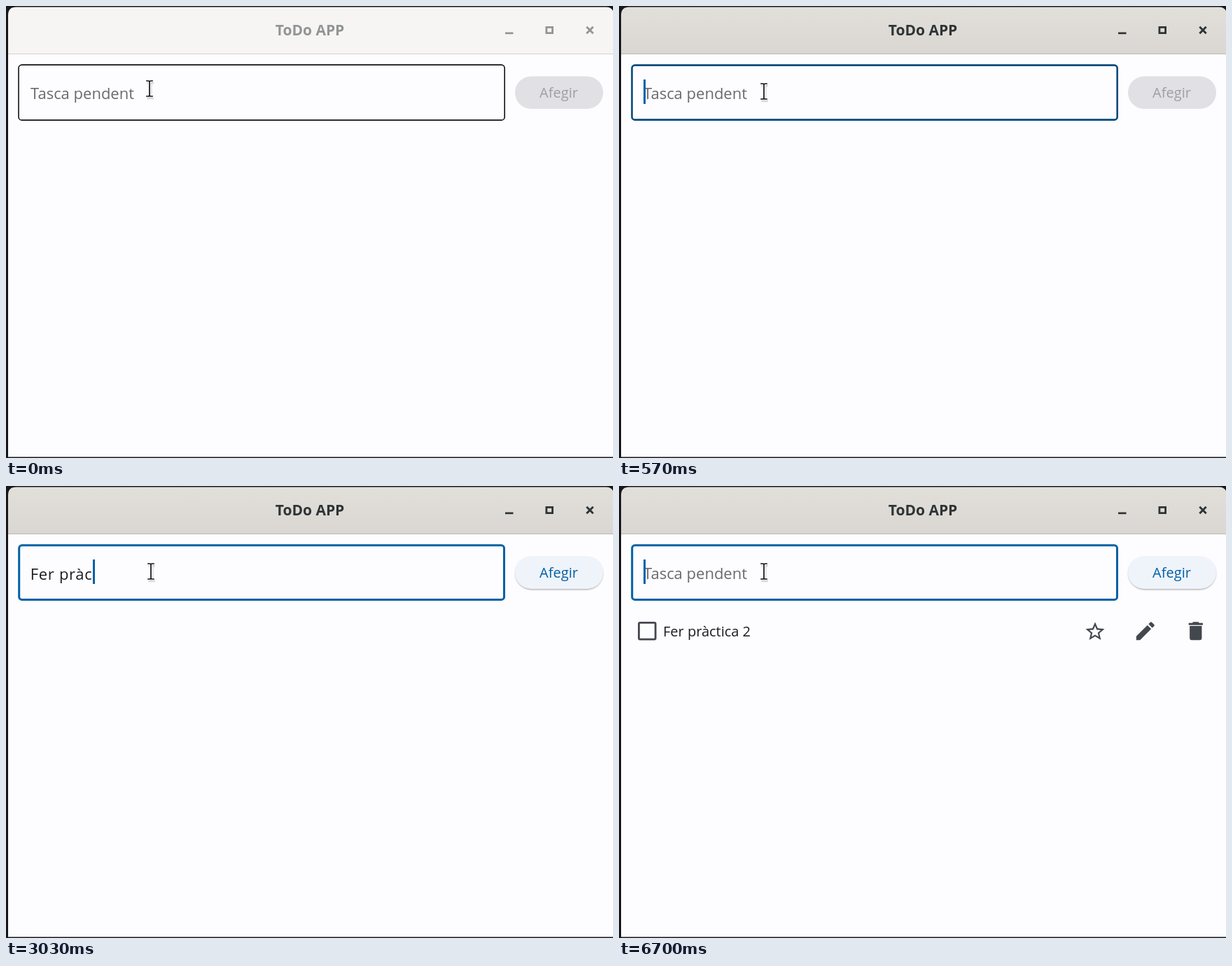
An HTML page for the animation above (8 s loop, 867 px wide and 646 px high).

```html
<!DOCTYPE html>
<html lang="ca">
<head>
<meta charset="utf-8">
<title>ToDo APP</title>
<style>
  html, body { margin: 0; width: 100%; height: 100%; overflow: hidden; background: #171719; }
  svg { display: block; width: 867px; height: 646px; }
  text { font: 22px "Open Sans", "Noto Sans", sans-serif; white-space: pre; }
  #title { font-size: 21px; font-weight: 700; }
  #label, #task text { font-size: 20px; }
  #typed { letter-spacing: .7px; }
</style>
</head>
<body>
<svg viewBox="0 0 867 646">
  <defs>
    <linearGradient id="active" x2="0" y2="1">
      <stop stop-color="#e2dfdb"/>
      <stop offset="1" stop-color="#dad6d1"/>
    </linearGradient>
    <filter id="soft" x="-10%" y="-20%" width="120%" height="150%">
      <feGaussianBlur stdDeviation="1"/>
    </filter>
    <path id="beam" d="M-4-11H-2Q0-11 0-9.500Q0-11 2-11H4M-4 11H-2Q0 11 0 9.500Q0 11 2 11H4M0-10V10"/>
  </defs>

  <rect width="867" height="646" fill="#171719"/>
  <path id="header" d="M3 69V13Q3 1.500 14.500 1.500H857Q868 1.500 868 13V69Z"/>
  <rect id="rule" x="3" y="68" width="864" height="1"/>
  <rect x="3" y="69" width="864" height="575.500" fill="#fdfcff"/>

  <g id="chrome">
    <text id="title" x="434" y="42" text-anchor="middle">ToDo APP</text>
    <rect x="713" y="37.500" width="11.500" height="2.700"/>
    <path d="M770.500 29H782V40H770.500ZM773.300 31.800V37.200H779.200V31.800Z" fill-rule="evenodd"/>
    <path id="close" d="M829.300 29.800L838.700 39.200M838.700 29.800L829.300 39.200" stroke-width="2.900"/>
  </g>

  <rect id="field" fill="none"/>
  <text id="hint" x="35" y="133" fill="#6a6a6d">Tasca pendent</text>
  <text id="typed" x="34.700" y="134" fill="#1a1c1e"></text>
  <rect id="caret" y="105" width="3" height="35" fill="#0061a4"/>

  <rect id="shadow" x="727.500" y="102" width="125" height="46.300" rx="23.150" fill="#000" filter="url(#soft)"/>
  <rect id="button" x="727" y="100.500" width="126" height="46.500" rx="23.250"/>
  <text id="label" x="789.500" y="131" text-anchor="middle">Afegir</text>

  <g id="task" fill="#43474e">
    <rect x="28.400" y="195.400" width="23.700" height="23.700" rx="1.500" fill="none" stroke="#43474e" stroke-width="2.800"/>
    <text x="63" y="215" fill="#1a1c1e">Fer pràctica 2</text>
    <path transform="translate(663.800 191.700) scale(1.350)" d="M22 9.240l-7.190-.62L12 2 9.190 8.630 2 9.240l5.460 4.730L5.820 21 12 17.270 18.180 21l-1.630-7.030zM12 15.400l-3.760 2.270 1-4.280-3.320-2.880 4.380-.38L12 6.100l1.710 4.040 4.380.38-3.320 2.880 1 4.280z"/>
    <path transform="translate(734.500 190) scale(1.440)" d="M3 17.250V21h3.750L17.810 9.940l-3.750-3.750zM20.710 7.040q.59-.7 0-1.410l-2.340-2.340q-.7-.59-1.410 0l-1.830 1.830 3.750 3.750z"/>
    <path transform="translate(806.500 190) scale(1.440)" d="M6 19q0 2 2 2h8q2 0 2-2V7H6zM19 4h-3.500l-1-1h-5l-1 1H5v2h14z"/>
  </g>

  <g id="pointer" fill="none" stroke-linecap="square">
    <use href="#beam" x="1" y="2" stroke="#777" stroke-width="3" opacity=".45" filter="url(#soft)"/>
    <use href="#beam" stroke="#fff" stroke-width="3.600"/>
    <use href="#beam" stroke="#151515" stroke-width="1.700"/>
  </g>
</svg>
<script>
const LOOP = 8000;

// start time, typed text, caret x (null while hidden)
const TYPING = [
  [0, "", null],
  [470, "", 35],
  [900, "", null],
  [1100, "F", 49],
  [1330, "Fe", 61],
  [1470, "Fer", 70.5],
  [1630, "Fer ", 77],
  [2200, "Fer ", null],
  [2500, "Fer pr", 100],
  [3030, "Fer pràc", 124],
  [3530, "Fer pràctui", 153],
  [4030, "Fer pràctui", null],
  [4970, "Fer pràcti", 140],
  [5830, "Fer pràctica", null],
  [6700, "", 35]
];

// start time, fill, label colour, shadow opacity
const BUTTON = [
  [0, "#e1e0e4", "#9f9ea2", 0],
  [1100, "#fdfcff", "#a3a2a6", .03],
  [1200, "#f5f7fc", "#4d80aa", .15],
  [1330, "#eff3fa", "#0061a4", .32]
];

const $ = id => document.getElementById(id);
const set = (id, attrs) => {
  for (const key in attrs) $(id).setAttribute(key, attrs[key]);
};
const show = (id, on) => set(id, { visibility: on ? "visible" : "hidden" });
const stepAt = (table, t) => table.findLast(row => row[0] <= t);
const mix = (a, b, p) => a + (b - a) * p;

function drawWindow(t) {
  const focused = t >= 470;
  const ink = focused ? "#2e3436" : "#929595";
  set("header", { fill: focused ? "url(#active)" : "#f6f5f4" });
  set("rule", { fill: focused ? "#bfb8b1" : "#d9d1cb" });
  set("chrome", { fill: ink });
  set("close", { stroke: ink });
}

function drawField(t) {
  const p = t < 470 ? 0 : Math.min(1, .12 + (t - 470) / 170);
  const width = mix(1.6, 3, p);
  set("field", {
    x: 17.2 + width / 2, y: 83.3 + width / 2,
    width: 695.8 - width, height: 80.6 - width, rx: 5.5 - width / 2,
    "stroke-width": width,
    stroke: `rgb(${mix(16, 0, p)}, ${mix(17, 97, p)}, ${mix(19, 164, p)})`
  });
  const [, text, caret] = stepAt(TYPING, t);
  $("typed").textContent = text;
  show("hint", t < 1200 || t >= 6700);
  show("caret", caret !== null);
  if (caret !== null) set("caret", { x: caret });
}

function drawButton(t) {
  const [, fill, ink, shade] = stepAt(BUTTON, t);
  set("button", { fill });
  set("label", { fill: ink });
  set("shadow", { opacity: shade });
}

function render(t) {
  drawWindow(t);
  drawField(t);
  drawButton(t);
  show("task", t >= 6700);
  set("pointer", { transform: t < 30 ? "translate(205 118)" : "translate(207 122)" });
}

const start = performance.now();
function tick() {
  render((performance.now() - start) % LOOP);
  requestAnimationFrame(tick);
}
tick();
</script>
</body>
</html>
```
